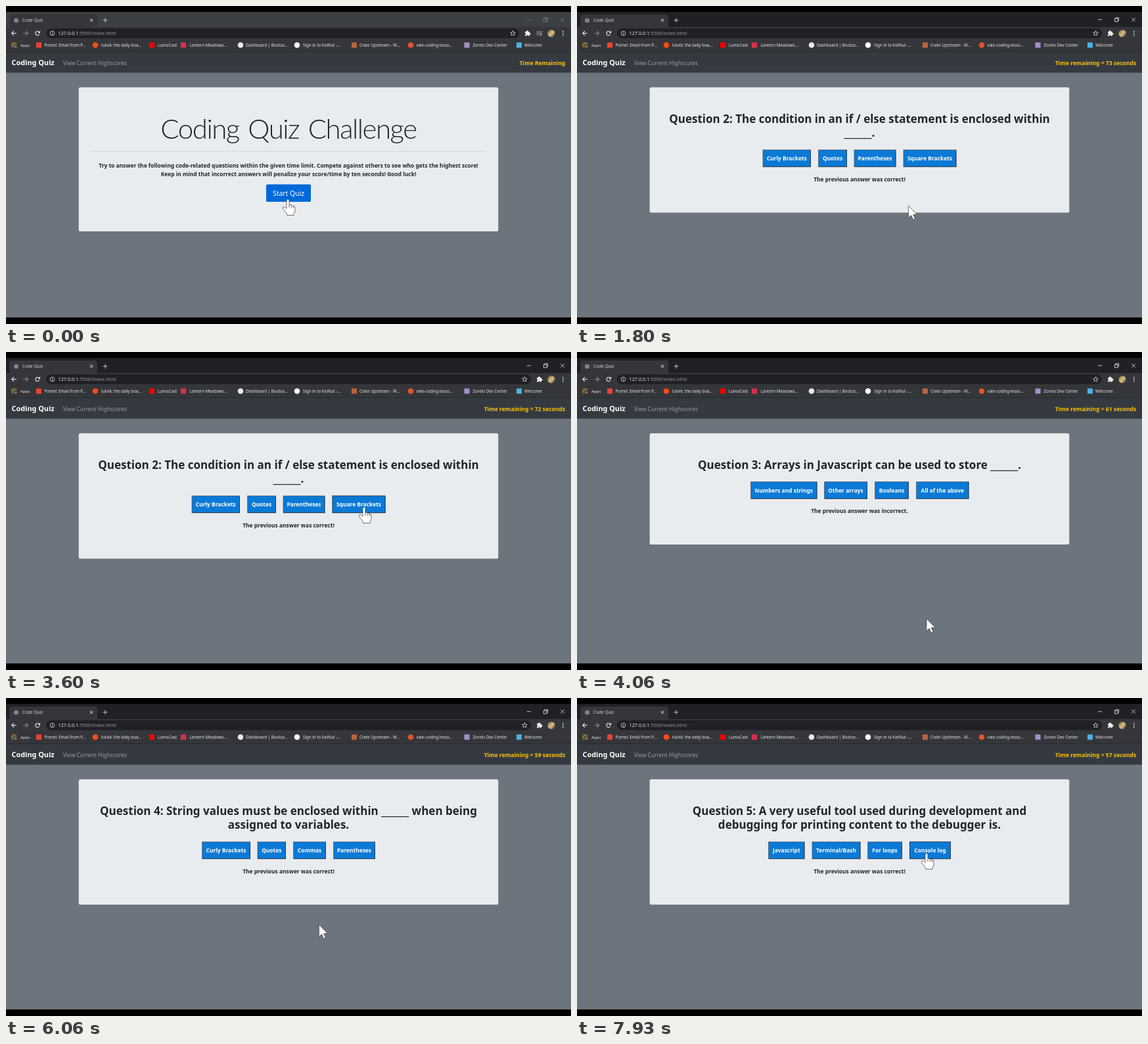
Animation of 860 by 484 pixels, one loop 8000 ms. Source, as an HTML page with a canvas:

```html
<!DOCTYPE html>
<html lang="en">
<head>
<meta charset="utf-8">
<title>Code Quiz</title>
<style>
  html, body { margin: 0; width: 100%; height: 100%; overflow: hidden; background: #000; }
  canvas { display: block; width: 860px; height: 484px; }
</style>
</head>
<body>
<canvas id="stage"></canvas>
<script>
const W = 860, H = 484, LOOP = 8000;
const SANS = '"Noto Sans", "Open Sans", sans-serif';
const canvas = document.getElementById('stage');
const ctx = canvas.getContext('2d');
const dpr = window.devicePixelRatio || 1;
canvas.width = W * dpr;
canvas.height = H * dpr;

const FOCUS = 60, QUIZ_START = 130, FIRST_TICK = 730, TOOLBAR_SHIFT = 1560, PENALTY = 3650;
const RIGHT = 'The previous answer was correct!';
const WRONG = 'The previous answer was incorrect.';

// Each button: label, left edge, right edge. "press" is [button, from, to].
const screens = [
  { at: 0, bottom: 343 },
  { at: QUIZ_START, bottom: 301, press: [3, 1460, 1560],
    lines: ['Question 1: Commonly used data types DO NOT include which of the', 'following.'],
    buttons: [['Booleans', 320.5, 373], ['Numbers', 383.5, 436], ['Strings', 447, 490], ['Alerts', 501, 539.5]] },
  { at: TOOLBAR_SHIFT, bottom: 314.5, note: RIGHT, press: [3, 3600, 3650],
    lines: ['Question 2: The condition in an if / else statement is enclosed within', '______.'],
    buttons: [['Curly Brackets', 282.5, 356], ['Quotes', 367, 411], ['Parentheses', 421.5, 485.5], ['Square Brackets', 496.5, 577.5]] },
  { at: PENALTY, bottom: 293, note: WRONG, press: [3, 5330, 5460],
    lines: ['Question 3: Arrays in Javascript can be used to store ______.'],
    buttons: [['Numbers and strings', 264, 365.5], ['Other arrays', 376, 442], ['Booleans', 453, 505], ['All of the above', 516, 596.5]] },
  { at: 5460, bottom: 314.5, note: RIGHT, press: [1, 6730, 6870],
    lines: ['Question 4: String values must be enclosed within ______ when being', 'assigned to variables.'],
    buttons: [['Curly Brackets', 298, 372], ['Quotes', 382.5, 426], ['Commas', 437, 487], ['Parentheses', 498, 562]] },
  { at: 6870, bottom: 314.5, note: RIGHT, press: [3, 7860, 8000],
    lines: ['Question 5: A very useful tool used during development and', 'debugging for printing content to the debugger is.'],
    buttons: [['Javascript', 291, 346.5], ['Terminal/Bash', 357.5, 431.5], ['For loops', 442, 495], ['Console log', 506, 569]] }
];

// Pointer stops: time, x, y
const path = [
  [0, 429, 294], [530, 429, 294], [750, 431, 309], [1000, 424, 245.5],
  [1330, 522, 234], [1560, 522, 234], [1900, 500, 322], [2200, 430, 280],
  [2260, 430, 280], [2600, 411, 237], [2930, 545, 236], [3620, 545, 236],
  [3950, 532, 406], [4060, 532, 406], [4330, 542, 238], [4460, 542, 238],
  [5000, 544.5, 217], [5660, 544.5, 217], [6000, 480, 349], [6460, 405, 262],
  [6530, 405, 262], [6780, 409, 231], [6870, 409, 231], [7100, 500, 360],
  [7330, 530, 297], [7400, 530, 297], [7800, 532, 236], [8000, 532, 236]
];

// Bookmarks: icon centre, text x, label, icon colour, round?
const bookmarks = [
  [50, 58.5, 'Pomel: Email from P...', '#ea4335', false],
  [136, 145, 'tulvik: the daily boa...', '#ff4a14', true],
  [222, 231, 'LumoCast', '#f00000', false],
  [270, 279.5, 'Lantern Meadows...', '#d8304a', false],
  [357, 365, 'Dashboard | Bootca...', '#e8eaed', true],
  [443, 452, 'Sign in to KelNut -...', '#ffffff', true],
  [530, 538, 'Crate Upstream - W...', '#b8643c', false],
  [616, 624.5, 'vale-coding-lesso...', '#e2512f', true],
  [701.5, 710.5, 'Zorelo Dev Center', '#a78fca', false],
  [781, 789, 'Welcome', '#4db1e2', false]
];

function rect(x, y, w, h, color) {
  ctx.fillStyle = color;
  ctx.fillRect(x, y, w, h);
}

function round(x, y, w, h, r, color) {
  ctx.fillStyle = color;
  ctx.beginPath();
  ctx.roundRect(x, y, w, h, r);
  ctx.fill();
}

function dot(x, y, r, color) {
  ctx.fillStyle = color;
  ctx.beginPath();
  ctx.arc(x, y, r, 0, 7);
  ctx.fill();
}

function ring(x, y, r, color, from = 0, to = 2 * Math.PI) {
  ctx.strokeStyle = color;
  ctx.beginPath();
  ctx.arc(x, y, r, from, to);
  ctx.stroke();
}

function line(color, ...pts) {
  ctx.strokeStyle = color;
  ctx.beginPath();
  for (let i = 0; i < pts.length; i += 2) ctx.lineTo(pts[i], pts[i + 1]);
  ctx.stroke();
}

function cross(x, y, r, color) {
  line(color, x - r, y - r, x + r, y + r);
  line(color, x + r, y - r, x - r, y + r);
}

function text(str, x, y, size, color, { weight = 400, align = 'left', family = SANS } = {}) {
  ctx.font = `${weight} ${size}px ${family}`;
  ctx.textAlign = align;
  ctx.fillStyle = color;
  ctx.fillText(str, x, y);
}

const bold = { weight: 700 };
const boldMid = { weight: 700, align: 'center' };

function drawTabs(t) {
  const focused = t >= FOCUS;
  rect(0, 9, W, 24, focused ? '#202124' : '#3c4043');
  round(5, 13, 134, 22, [4, 4, 0, 0], '#35363a');
  dot(15.5, 22, 3.6, '#7d8286');
  text('Code Quiz', 24.8, 24.4, 6.6, '#d5d7da');
  ctx.lineWidth = 1;
  cross(130, 21.7, 2.2, '#e8eaed');
  line('#c4c7ca', 147.6, 21.7, 154.4, 21.7);
  line('#c4c7ca', 151, 18.3, 151, 25.1);
  const c = focused ? '#e8eaed' : '#7c8084';
  ctx.lineWidth = 0.8;
  line(c, 793, 20.7, 799, 20.7);
  ctx.strokeStyle = c;
  ctx.strokeRect(818.5, 19.2, 4.6, 4.6);
  line(c, 820, 19, 820, 17.6, 824.6, 17.6, 824.6, 22.2, 823.4, 22.2);
  cross(847, 20.7, 2.9, c);
}

function drawStar(x, y) {
  ctx.strokeStyle = '#e0e2e5';
  ctx.beginPath();
  for (let i = 0; i < 10; i++) {
    const a = i * Math.PI / 5 - Math.PI / 2, r = i % 2 ? 1.8 : 4;
    ctx.lineTo(x + r * Math.cos(a), y + r * Math.sin(a));
  }
  ctx.closePath();
  ctx.stroke();
}

function drawPuzzle(x, y) {
  round(x - 4, y - 2.5, 6.8, 6.6, 0.8, '#eceef0');
  dot(x - 0.6, y - 2.8, 1.5, '#eceef0');
  dot(x + 3, y + 0.8, 1.5, '#eceef0');
  dot(x - 3.8, y + 0.8, 1.1, '#35363a');
  dot(x - 0.6, y + 3.9, 1.1, '#35363a');
}

function drawToolbar(t) {
  const shifted = t >= TOOLBAR_SHIFT;
  rect(0, 32, W, 37.5, '#35363a');
  round(61, 34, shifted ? 738 : 720, 15, 7.5, '#202124');
  ctx.lineWidth = 1.1;
  line('#e8eaed', 15.8, 41.5, 8.8, 41.5);
  line('#e8eaed', 12, 38.2, 8.7, 41.5, 12, 44.8);
  line('#85888c', 26.4, 41.5, 33.4, 41.5);
  line('#85888c', 30.2, 38.2, 33.5, 41.5, 30.2, 44.8);
  ring(48, 41.6, 3.1, '#e8eaed', 0.5, 5.6);
  ctx.fillStyle = '#e8eaed';
  ctx.beginPath();
  ctx.moveTo(52, 37.6);
  ctx.lineTo(52, 41.3);
  ctx.lineTo(48.3, 41.3);
  ctx.fill();
  ctx.lineWidth = 0.9;
  ring(70.5, 41.6, 3.3, '#d5d7da');
  rect(70.05, 41, 0.9, 2.4, '#d5d7da');
  rect(70.05, 39.5, 0.9, 0.9, '#d5d7da');

  const host = '127.0.0.1';
  text(host, 79.5, 44.3, 7.25, '#e8eaed');
  text(':5500/index.html', 79.5 + ctx.measureText(host).width, 44.3, 7.25, '#94989d');

  ctx.lineWidth = 0.8;
  drawStar(shifted ? 789.5 : 771.5, 41.7);
  drawPuzzle(shifted ? 812 : 794, 41.5);
  if (!shifted) {
    for (const [y, w] of [[38.7, 6], [41, 6], [43.3, 3.5]]) rect(807.5, y, w, 0.9, '#aeb1b5');
    rect(814.5, 38.7, 0.9, 5, '#aeb1b5');
    rect(814.5, 38.7, 2.2, 0.9, '#aeb1b5');
    dot(813.9, 43.9, 1.3, '#aeb1b5');
  }
  const face = ctx.createLinearGradient(825, 37, 836, 47);
  face.addColorStop(0, '#8a6a32');
  face.addColorStop(0.5, '#d9c08b');
  face.addColorStop(1, '#3a2c1c');
  dot(830, 41.8, 5.6, face);
  for (const y of [38.6, 41.6, 44.6]) dot(847.8, y, 0.9, '#e8eaed');
}

function drawBookmarks() {
  const hues = ['#e0533f', '#e8b52f', '#4aa05a'];
  for (let i = 0; i < 9; i++)
    rect(8.4 + i % 3 * 2.8, 55.6 + Math.floor(i / 3) * 2.8, 1.9, 1.9, hues[(i + Math.floor(i / 3)) % 3]);
  text('Apps', 22, 61.8, 6.15, '#e3e5e8');
  for (const [cx, x, label, color, isRound] of bookmarks) {
    if (isRound) dot(cx, 59.5, 4.3, color);
    else rect(cx - 4, 55.5, 8, 8, color);
    text(label, x, 61.8, 6.2, '#e3e5e8');
  }
}

function timerText(t) {
  if (t < FIRST_TICK) return 'Time Remaining';
  const left = 74 - Math.floor((t - FIRST_TICK) / 1000) - (t >= PENALTY ? 10 : 0);
  return `Time remaining = ${left} seconds`;
}

function drawNav(t) {
  rect(0, 69.5, W, 32, '#343a40');
  text('Coding Quiz', 8.6, 90.3, 10.85, '#fff', bold);
  text('View Current Highscores', 86.8, 89.5, 8.45, '#9a9da0');
  text(timerText(t), 851.3, 89.5, 8.6, '#ffc107', { weight: 700, align: 'right' });
}

function drawIntro() {
  ctx.letterSpacing = '-1.5px';
  ctx.wordSpacing = '3.6px';
  text('Coding Quiz Challenge', 430, 202, 42, '#212529',
    { weight: 300, align: 'center', family: 'Lato, "Open Sans", sans-serif' });
  ctx.letterSpacing = ctx.wordSpacing = '0px';
  rect(128, 221, 604, 0.8, '#d2d5d8');
  text('Try to answer the following code-related questions within the given time limit. Compete against others to see who gets the highest score!',
    430, 245.8, 8.42, '#212529', boldMid);
  text('Keep in mind that incorrect answers will penalize your score/time by ten seconds! Good luck!',
    430, 259.2, 8.42, '#212529', boldMid);
  round(396, 271.5, 68, 26.6, 2.2, '#0062cc');
  round(396.4, 271.9, 67.2, 25.8, 1.9, '#0069d9');
  text('Start Quiz', 430, 289, 10.4, '#fff', { align: 'center' });
}

const buttonTop = s => s.lines.length > 1 ? 218.5 : 197;

function drawButton([label, x0, x1], y, pressed) {
  const w = x1 - x0, h = 26.6, b = 0.9;
  rect(x0, y, w, h, pressed ? '#1d2630' : '#767a80');
  rect(x0 + b, y + b, w - b, h - b, '#2b3440');
  rect(x0 + b, y + b, w - 2 * b, h - 2 * b, '#0b7ad6');
  text(label, (x0 + x1) / 2, y + 16.6, 8.42, '#fff', boldMid);
}

function drawQuestion(s, t) {
  s.lines.forEach((str, i) => text(str, 430, 177.8 + i * 21.5, 17.02, '#212529', boldMid));
  const y = buttonTop(s), [hit, from, to] = s.press;
  s.buttons.forEach((b, i) => drawButton(b, y, i === hit && t >= from && t < to));
  if (s.note) text(s.note, 430, y + 48.2, 8.42, '#212529', boldMid);
}

function pointerAt(t) {
  const i = Math.max(1, path.findIndex(p => p[0] > t));
  const [t0, x0, y0] = path[i - 1], [t1, x1, y1] = path[i];
  const k = (t - t0) / (t1 - t0), e = k * k * (3 - 2 * k);
  return [x0 + (x1 - x0) * e, y0 + (y1 - y0) * e];
}

function overButton(s, x, y) {
  if (!s.buttons) return x > 396 && x < 464 && y > 271 && y < 298;
  const top = buttonTop(s);
  return y > top && y < top + 26.5 && s.buttons.some(b => x >= b[1] && x <= b[2]);
}

const arrow = new Path2D('M0 0V18.6L4.2 14.7L7.2 21.4L10.2 20L7.3 13.6H13.2Z');
const hand = new Path2D('M-2 2Q-2 0 0 0Q2 0 2 2V8.8Q4.6 7.6 5.4 9.6Q7.8 8.6 8.4 10.8Q11 10.2 11 13V17Q11 20 9 22V24.5H-1Q-1.6 21.4 -4.2 18.6L-7.4 14.8Q-8.6 12.6 -6.8 11.7Q-4.8 11.1 -2 14.4Z');
const knuckles = new Path2D('M2 8.8V13M5.4 9.6V13.4M8.4 10.8V13.8');

function drawPointer(s, t) {
  const [x, y] = pointerAt(t);
  const over = overButton(s, x, y), shape = over ? hand : arrow;
  ctx.save();
  ctx.translate(x, y);
  ctx.lineWidth = 0.65;
  ctx.lineJoin = 'round';
  ctx.fillStyle = '#fff';
  ctx.strokeStyle = '#24282c';
  ctx.fill(shape);
  ctx.stroke(shape);
  if (over) ctx.stroke(knuckles);
  ctx.restore();
}

function draw(t) {
  const s = screens.filter(v => v.at <= t).pop();
  ctx.setTransform(dpr, 0, 0, dpr, 0, 0);
  rect(0, 0, W, H, '#000');
  drawTabs(t);
  drawToolbar(t);
  drawBookmarks();
  rect(0, 101, W, 373, '#6c757d');
  drawNav(t);
  round(110.7, 123.8, 638.6, s.bottom - 123.8, 2.6, '#e9ecef');
  if (s.lines) drawQuestion(s, t);
  else drawIntro();
  drawPointer(s, t);
}

const start = performance.now();
function frame() {
  draw((performance.now() - start) % LOOP);
  requestAnimationFrame(frame);
}
frame();
</script>
</body>
</html>
```
